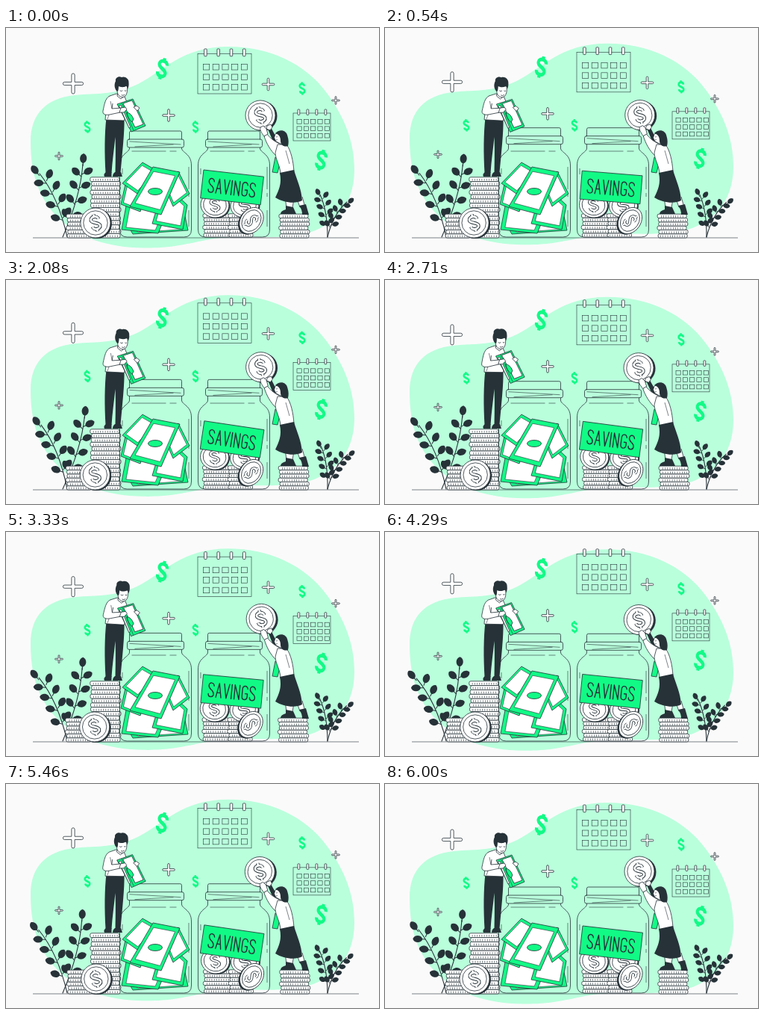
Recreate the animation shown at these times as an HTML page. Size 500 by 300 pixels, loop 6040 ms.

```html
<!DOCTYPE html>
<html lang="en">
<head>
<meta charset="utf-8">
<title>Savings</title>
<style>
  html, body { margin: 0; width: 100%; height: 100%; overflow: hidden; background: #fafafa; }
  svg { display: block; width: 500px; height: 300px; }
  .ink { fill: #263238; }
  .line { fill: none; stroke: #263238; stroke-width: .8; stroke-linejoin: round; stroke-linecap: round; }
  .fine { fill: none; stroke: #263238; stroke-width: .6; }
  .paper { fill: #fff; stroke: #263238; stroke-width: .8; stroke-linejoin: round; }
  .note { fill: #12fa86; stroke: #263238; stroke-width: .8; stroke-linejoin: round; }
</style>
</head>
<body>
<svg id="stage" viewBox="0 0 500 300"></svg>
<script>
const INK = '#263238', GREEN = '#12fa86', LOOP = 6040;

const path = (cls, d, extra = '') => `<path class="${cls}" d="${d}" ${extra}/>`;
const rect = (cls, x, y, w, h, rx = 0) => `<rect class="${cls}" x="${x}" y="${y}" width="${w}" height="${h}" rx="${rx}"/>`;
const oval = (cls, x, y, rx, ry, turn = 0) =>
  `<ellipse class="${cls}" rx="${rx}" ry="${ry}" transform="translate(${x} ${y}) rotate(${turn})"/>`;
const group = (id, body) => `<g id="${id}">${body}</g>`;

// Dollar sign, 20 units high, centred on the origin
const DOLLAR = 'M4.3-3.6C4-8-4.4-8.4-4.4-4C-4.4 0 4.4 0 4.4 4C4.4 8.4-4 8-4.3 3.6M0-10V-7M0 7V10';
const stroke = (color, width) => `<path d="${DOLLAR}" fill="none" stroke="${color}" stroke-width="${width}"/>`;
const dollar = (x, y, size, turn) =>
  `<g transform="translate(${x} ${y}) rotate(${turn}) scale(${size * .85} ${size})">${stroke(GREEN, 3.4)}</g>`;

function coin(x, y, rx, ry, turn, edge, signTurn = -14) {
  return oval('ink', x + edge, y + 1, rx, ry, turn) +
    oval('paper', x, y, rx, ry, turn) + oval('paper', x, y, rx * .81, ry * .81, turn) +
    `<g transform="translate(${x} ${y}) rotate(${turn + signTurn}) scale(${rx / 17} ${ry / 17})">` +
    stroke(INK, 3.9) + stroke('#fff', 2.3) + '</g>';
}

function stack(x, bottom, w, count, h) {
  let out = '';
  for (let i = 0; i < count; i++) {
    const left = x + Math.sin(i * 2.3) * 1.2, y = bottom - (i + 1) * h;
    out += rect('paper', left, y, w, h, 2) +
      path('fine', `M${left + 3 + i % 3} ${y + h * .6}H${left + w - 2}`,
        'style="stroke-width:2.6;stroke-dasharray:.6 2.6"');
  }
  return out;
}

function plus(x, y, r, t) {
  const a = r - t;
  return path('paper', `M${x - t} ${y - t}v${-a}q0 ${-t} ${t} ${-t}t${t} ${t}v${a}h${a}q${t} 0 ${t} ${t}t${-t} ${t}` +
    `h${-a}v${a}q0 ${t} ${-t} ${t}t${-t} ${-t}v${-a}h${-a}q${-t} 0 ${-t} ${-t}t${t} ${-t}z`);
}

function calendar(x, y, w, h, cell, left, top, stepX, stepY, hook) {
  let out = rect('fine', x, y, w, h);
  for (let i = 0; i < 4; i++)
    out += rect('paper', x + w * (.12 + i * .24), y - hook, hook * .55, hook * 1.5, .8);
  for (let r = 0; r < 3; r++)
    for (let c = 0; c < 5; c++)
      out += rect('fine', x + left + c * stepX, y + top + r * stepY, cell, cell * .92);
  return out;
}

// Curved stem with round leaves on short stalks, in pairs, and one on the tip
function plant(x0, y0, cx, cy, x1, y1, pairs, size) {
  let out = path('line', `M${x0} ${y0}Q${cx} ${cy} ${x1} ${y1}`, 'style="stroke-width:1.1"');
  const leaf = (x, y, turn, s) =>
    `<path class="ink" transform="translate(${x} ${y}) rotate(${turn}) scale(${s})" d="M-.5 0V-4C-6-6-6-15 0-17C6-15 6-6 .5-4V0"/>`;
  for (let i = 0; i <= pairs; i++) {
    const u = .22 + .78 * i / pairs, v = 1 - u;
    const x = v * v * x0 + 2 * u * v * cx + u * u * x1;
    const y = v * v * y0 + 2 * u * v * cy + u * u * y1;
    const dx = v * (cx - x0) + u * (x1 - cx), dy = v * (cy - y0) + u * (y1 - cy);
    const turn = Math.atan2(dx, -dy) * 180 / Math.PI;
    if (i === pairs) out += leaf(x, y + 3, turn, size);
    else out += leaf(x, y, turn - 55, size) + leaf(x, y - 3, turn + 55, size);
  }
  return out;
}

// Banknote from its four corners, with the white field shrunk towards the middle
function bill(...corners) {
  const mx = (corners[0] + corners[2] + corners[4] + corners[6]) / 4;
  const my = (corners[1] + corners[3] + corners[5] + corners[7]) / 4;
  const field = corners.map((v, i) => { const m = i % 2 ? my : mx; return m + (v - m) * .8; });
  const shape = p => 'M' + p.join(' ') + 'z';
  return path('note', shape(corners)) + path('paper', shape(field), 'style="stroke-width:.6"');
}

const jar = x => path('line',
  `M${x + 13} 152V161C${x + 13} 167 ${x} 168 ${x} 184V270Q${x} 280 ${x + 10} 280H${x + 86}Q${x + 96} 280 ${x + 96} 270` +
  `V184C${x + 96} 168 ${x + 83} 167 ${x + 83} 161V152`) +
  path('fine', `M${x + 92.5} 186V216M${x + 92.5} 221V226M${x + 92.5} 244V266M${x + 3.5} 188V196` +
    `M${x + 16} 165H${x + 62}M${x + 67} 165H${x + 76}`);

const lid = x => `<g fill="#b9ffdc">` +
  rect('lid', x + 13, 138, 70, 12, 1.5) + rect('lid', x + 10, 149, 76, 11, 2.5) + '</g>' +
  path('line', `M${x + 13} 149V140Q${x + 13} 138 ${x + 15} 138H${x + 81}Q${x + 83} 138 ${x + 83} 140V149`) +
  rect('line', x + 10, 149, 76, 11, 2.5) +
  path('fine', `M${x + 13} 152L${x + 82} 156M${x + 20} 159L${x + 72} 156`);

const LETTERS = {
  S: 'M7 4C6-1 0-1 0 4C0 10 7 9 7 15C7 20 0 20 0 15',
  A: 'M0 19L3.5 0L7 19M1.3 12.5H5.8', V: 'M0 0L3.5 19L7 0', I: 'M0 0V19',
  N: 'M0 19V0L6.5 19V0', G: 'M7 4C6-1 0-1 0 5V14C0 20 7 20 7 14V10.5H4'
};
function lettering(word, x, y) {
  let out = '';
  for (const ch of word) {
    out += `<path class="line" style="stroke-width:1.4" transform="translate(${x} ${y})" d="${LETTERS[ch]}"/>`;
    x += ch === 'I' ? 4 : 10.3;
  }
  return `<g role="img" aria-label="${word}">${out}</g>`;
}

const blob = path('blob', 'M33 152C33 115 54 94 92 90C122 87 147 90 177 75C212 57 236 25 298 25' +
  'C352 25 401 47 430 87C455 121 467 154 467 190C467 238 438 271 388 278C345 283 309 276 268 284' +
  'C235 291 216 295 184 294.5C138 294 95 282 65 249C41 222 33 190 33 152z', 'fill="#b9ffdc"');

const drift =
  calendar(257, 34.5, 72, 53.5, 8.2, 7.5, 14, 12.7, 13.5, 6.5) +
  calendar(385, 114, 50, 37, 6.2, 5, 8.5, 9.3, 9.4, 5) +
  dollar(209.5, 54.5, 1.45, 14) + dollar(422.5, 177, 1.42, 14) +
  dollar(109, 132.5, .82, -5) + dollar(254, 132.5, .82, -2) + dollar(397, 81, .86, -3) +
  plus(90, 74.5, 11.5, 2.1) + plus(218, 117, 7, 1.3) + plus(351.5, 75.5, 7, 1.3) +
  plus(442, 97, 4.5, .9) + plus(71, 171.5, 4.5, .9);

const manLegs = path('ink', 'M134.5 120L158.5 122C159 140 156 165 153.5 194H146.5C147 175 147 160 146.5 146' +
  'C145 162 142.5 178 141.5 194H133.5C132 168 132 142 134.5 120z') +
  path('ink', 'M134 193H141.5V199H132Q130 196 134 193M146 193H154L156 199H143Q143 195 146 193');

const manTop =
  path('paper', 'M139 91L148 88L159 92L164 104L158.5 124L133 123L134 112z') +
  path('paper', 'M150 86L149 91L154 95L159 91V86') +
  path('paper', 'M148 76L149 85C150 92 156 94.500 160 91C163 87 163 82 162 75z') +
  path('ink', 'M148 84C145 80 145 75 147 71C146 67 151 64 155 66C159 64 165 68 164.500 73C165 77 164 80 163 82' +
    'C163 79 162 78 161 78C157 80 153 79 151 78Q151 82 150 85z') +
  path('line', 'M153 84Q154.500 85.500 156 84M159 84Q160 85 161 84M155 90Q157 91 159 89.500') +
  path('note', 'M149 102L170 95L187 131L168 139z') +
  path('paper', 'M157 101L169 97L184 129L173 133z') +
  path('paper', 'M151.500 104L154 103L167 133L165 134z') +
  path('note', 'M162 113Q168 114 171 122L169 126Q163 121 162 113z') +
  path('fine', 'M155 100L171 137') +
  path('paper', 'M139 91C133 94 132 102 130 111C129 116 134 117 139 116L153 113L155 107L142 108L143 101') +
  path('paper', 'M152 113L154 107L160 106L162 109L158 113z') +
  path('paper', 'M171 106L175 104L179 107L176 111z') +
  path('fine', 'M140 98L142 108M136 122L138 116');

const womanArms = coin(341, 117, 20, 20, 0, 2.5) +
  path('ink', 'M350 133L354 131L363 148L366 156L358 152z') +
  path('paper', 'M372 165L363 172C354 164 349 154 346 145L350 142C355 149 362 153 369 156z') +
  path('paper', 'M346 145C342 140 340 136 341 133L345 131L349 135L351 142z') +
  path('paper', 'M349 135L350 131L355 129L357 133L354 137z');

const woman =
  path('note', 'M361 173L357 193L364 194L368 178z') +
  path('paper', 'M374 226L376 241H384L386 228M389 226L394 240H401L397 226') +
  path('ink', 'M375 238L385 240L389 249H368Q368 245 375 243zM393 238L402 236L406 250H397Q397 243 393 238') +
  path('paper', 'M364 156L376 156C382 164 385 178 386 192L368 196C368 185 361 176 361 167z') +
  path('ink', 'M367 194L386 190C390 204 396 215 397 231C388 236 372 234 361 227C366 217 370 208 367 194z') +
  path('paper', 'M367 140L361 142L359.500 147L362 152L370 156z') +
  path('ink', 'M361 141C366 135 376 136 377.500 145C379 150 379 154 378 158C373 160 368 157 368 151C368 147 367 143 361 141z') +
  path('fine', 'M362 146L364 145.500M362 150L364 149.500M375 164L380 182');

const bills =
  bill(160, 258, 240, 252, 244, 271, 170, 276) +
  bill(163, 228, 216, 246, 204, 275, 155, 270) +
  bill(212, 208, 243, 237, 237, 270, 196, 262) +
  bill(161, 205, 190, 216, 180, 246, 154, 236) +
  bill(183, 180, 204, 192, 176, 222, 156, 208) +
  bill(231, 192, 246, 222, 224, 239, 209, 205) +
  bill(197, 186, 233, 193, 208, 250, 166, 239) + oval('note', 200, 219, 9.5, 4.5);

const label = `<g transform="translate(265 190) rotate(6.500)">` +
  rect('note', 0, 0, 81, 38) + lettering('SAVINGS', 9, 10) + '</g>';

document.getElementById('stage').innerHTML =
  group('blob', blob) + group('drift', drift) +
  path('fine', 'M36 281H473') +
  group('leftPlant', plant(82, 280, 70, 226, 45, 195, 4, 1) + plant(76, 280, 100, 225, 103, 182, 4, 1)) +
  group('rightPlant', plant(431, 280, 431, 245, 421, 223, 4, .7) + plant(431, 280, 438, 250, 457, 233, 4, .7)) +
  stack(114, 281, 39, 14, 5.8) +
  group('piles', stack(82, 281, 33, 6, 5.3) + coin(120, 261, 20, 20, 0, 2) + stack(367, 281, 39, 6, 5.3)) +
  jar(152.5) + bills + jar(257.5) +
  group('jarCoins', stack(265, 280, 35, 6, 5.2) + stack(299, 280, 32, 6, 5.2) +
    coin(320, 238, 19, 16, -6, 1.5) + coin(280, 237, 19, 17, 8, 1.5) + coin(329, 258, 14.5, 19, 35, -2, 25)) +
  group('label', label) + group('lids', lid(152.5) + lid(257.5)) +
  manLegs + group('manTop', manTop) + group('womanArms', womanArms) + woman;

// Straight up and back down by six pixels
const lift = (t, period) => -6 * (1 - Math.abs(2 * (t / period % 1) - 1));
// Swing through 0, 1, 0, -1, 0
const swing = (t, period) => {
  const p = t / period % 1;
  return p < .25 ? 4 * p : p < .75 ? 2 - 4 * p : 4 * p - 4;
};
const up = period => t => `translate(0 ${lift(t, period)})`;
const turn = (deg, period, x, y) => t => `rotate(${deg * swing(t, period)} ${x} ${y})`;
const slide = (dx, period) => t => `translate(${dx * swing(t, period)} 0)`;

const MOTION = {
  blob: up(1500),
  lids: up(1500),
  drift: up(3000),
  leftPlant: turn(2.2, 6000, 80, 280),
  rightPlant: turn(2.2, 6000, 431, 280),
  piles: slide(-1.5, 1500),
  jarCoins: slide(-1, 1500),
  label: turn(-2.5, 3000, 303, 214),
  manTop: turn(1.7, 1500, 145, 124),
  womanArms: turn(1.8, 1500, 367, 158)
};
const parts = Object.entries(MOTION).map(([id, move]) => [document.getElementById(id), move]);

function draw(now) {
  const t = Math.min(now % LOOP, 6000);
  for (const [el, move] of parts) el.setAttribute('transform', move(t));
}
const start = performance.now();
function tick() {
  draw(performance.now() - start);
  requestAnimationFrame(tick);
}
tick();
</script>
</body>
</html>
```
